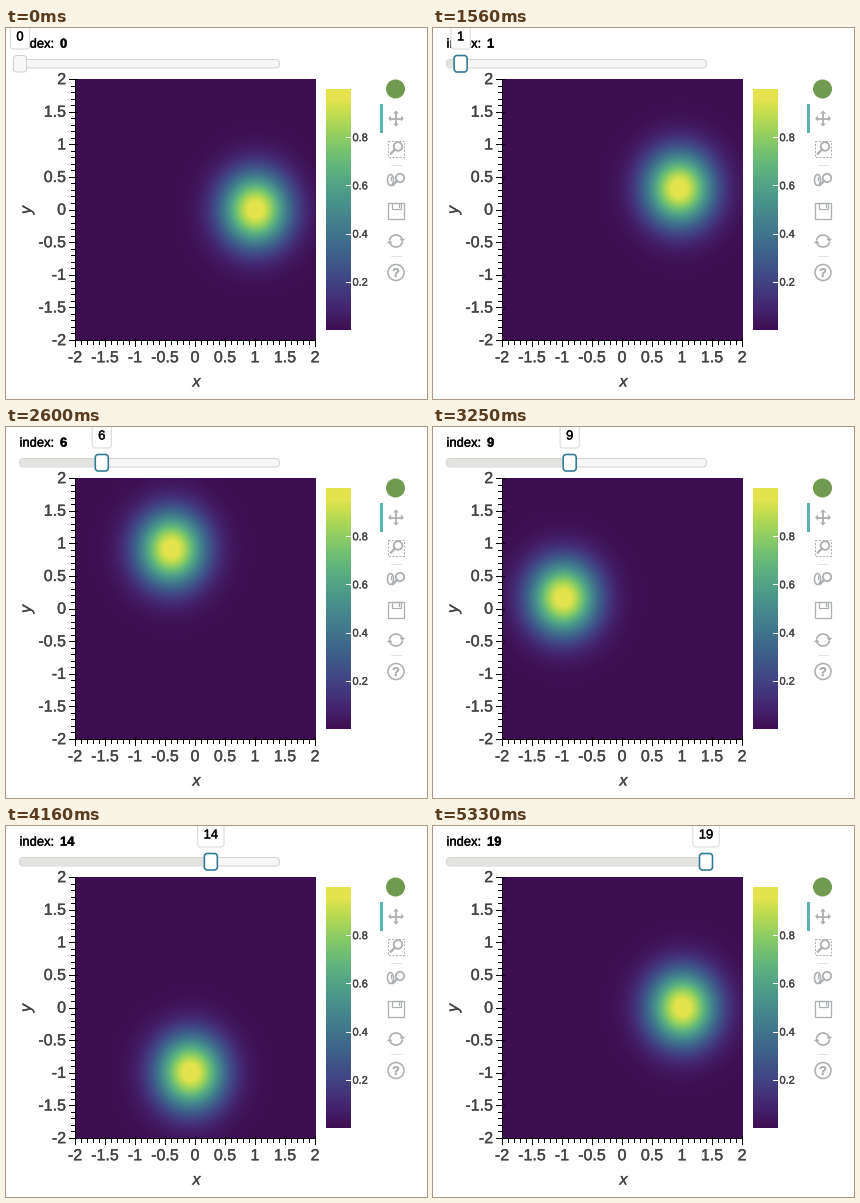
Write a matplotlib script that moves like this. It is 421x371 px and loops after 5980 ms.

```python
import numpy as np
import matplotlib.pyplot as plt
from matplotlib.animation import FuncAnimation
from matplotlib.colors import ListedColormap
from matplotlib.patches import (Circle, Ellipse, FancyBboxPatch, Polygon,
                                Rectangle)
from matplotlib.patheffects import withStroke

W, H, DPI = 421, 371, 100
FRAMES, INTERVAL = 46, 130
LEFT, RIGHT, TOP, BOTTOM = 69, 309, 51, 312
TRACK_X, TRACK_W, LAST = 14, 259, 19
SHARPNESS = 3.125
FOCUS_START = 6
# Frames on which the slider advances by one
STEPS = [12, 14, 15, 16, 18, 20, 22, 23, 25, 26,
         28, 29, 30, 32, 33, 35, 37, 39, 40]
INK, ICON = "#444444", "#adb0b2"

plt.rcParams["font.family"] = "Liberation Sans"
fig = plt.figure(figsize=(W / DPI, H / DPI), dpi=DPI, facecolor="white")
ax = fig.add_axes([0, 0, 1, 1])
ax.axis("off")


def soft_viridis():
    """Viridis as a wide-gamut screen shows it: muted, with a flat top."""
    rgb = plt.get_cmap("viridis")(np.linspace(0, 1, 256).clip(0, 0.96))[:, :3]
    linear = np.where(rgb <= 0.04045, rgb / 12.92,
                      ((rgb + 0.055) / 1.055) ** 2.4)
    mix = np.array([[0.8225, 0.1775, 0],
                    [0.07, 0.93, 0],
                    [0.0171, 0.0724, 0.9105]])
    linear = linear @ mix.T
    rgb = np.where(linear <= 0.0031308, linear * 12.92,
                   1.055 * linear ** (1 / 2.4) - 0.055)
    return ListedColormap(rgb.clip(0, 1))


CMAP = soft_viridis()


def pt(px):
    return px * 72 / DPI


def text(x, y, s, px, color=INK, ha="center", va="baseline", **kw):
    glow = [withStroke(linewidth=pt(0.35), foreground=color)]
    return ax.text(x, y, s, fontsize=pt(px), color=color, ha=ha, va=va,
                   path_effects=glow, **kw)


def label(x, cy, s, px, color=INK, **kw):
    """Text whose digits are vertically centred on cy."""
    return text(x, cy + 0.358 * px, s, px, color, **kw)


def line(xs, ys, color=ICON, lw=1.2, z=3):
    return ax.plot(xs, ys, color=color, lw=pt(lw), zorder=z)[0]


def rounded(x, y, w, h, r, face, edge, lw=1.0, z=4):
    box = FancyBboxPatch((x, y), w, h, fc=face, ec=edge, lw=pt(lw), zorder=z,
                         boxstyle=f"round,pad=0,rounding_size={r}")
    return ax.add_patch(box)


def outline(patch, lw=1.3):
    patch.set(fill=False, edgecolor=ICON, linewidth=pt(lw), zorder=3)
    return ax.add_patch(patch)


def arrowhead(x, y, dx, dy, size=3):
    """Filled triangle with its tip at (x, y), pointing along (dx, dy)."""
    bx, by = x - dx * size, y - dy * size
    ax.add_patch(Polygon([(x, y), (bx + dy * size, by + dx * size),
                          (bx - dy * size, by - dx * size)],
                         color=ICON, lw=0, zorder=3))


def px_x(v):
    return LEFT + (v + 2) / 4 * (RIGHT - LEFT)


def px_y(v):
    return BOTTOM - (v + 2) / 4 * (BOTTOM - TOP)


def draw_axes():
    line([LEFT, LEFT], [TOP, BOTTOM], "black", 1)
    line([LEFT, RIGHT], [BOTTOM, BOTTOM], "black", 1)
    for n in range(-20, 21):
        v = n / 10
        major = n % 5 == 0
        inner, outer = (2, 6) if major else (0, 4)
        line([px_x(v)] * 2, [BOTTOM - inner, BOTTOM + outer], "black", 1)
        line([LEFT + inner, LEFT - outer], [px_y(v)] * 2, "black", 1)
        if major:
            label(px_x(v), 328.5, f"{v:g}", 16)
            label(60, px_y(v) - 0.6, f"{v:g}", 16, ha="right")
    text(190.5, 358.5, "x", 16, style="italic")
    text(20.5, 182, "y", 16, style="italic", rotation=90, va="center")


def draw_colorbar():
    ramp = np.linspace(1, 0, 256)[:, None]
    ax.imshow(ramp, cmap=CMAP, extent=(320, 345, 302, 61),
              aspect="auto", zorder=2)
    for v in (0.2, 0.4, 0.6, 0.8):
        y = 302 - 241 * v
        line([340, 345], [y, y], "white", 1)
        label(346.5, y, f"{v:g}", 11, ha="left")


def magnifier(x, y, r):
    outline(Circle((x, y), r), 1.8)
    d = r * 0.72
    line([x - d, x - d - 4], [y + d, y + d + 4], lw=2.3)


def draw_toolbar():
    cx = 390
    ax.add_patch(Circle((389.5, 61), 9.5, color="#6f9a4f", lw=0))
    ax.add_patch(Rectangle((374, 76), 3, 29, color="#5ab4b4", lw=0))
    for y in (137, 228):
        line([385, 395], [y, y], "#e3e3e3", 1)

    # Pan
    line([cx - 6, cx + 6], [90.5, 90.5], lw=1.8)
    line([cx, cx], [84.5, 96.5], lw=1.8)
    for dx, dy in ((1, 0), (-1, 0), (0, 1), (0, -1)):
        arrowhead(cx + 8 * dx, 90.5 + 8 * dy, dx, dy)

    # Box zoom
    outline(Rectangle((382, 113), 16, 16), 1).set_linestyle((0, (2, 1.5)))
    magnifier(392, 118.5, 4.3)

    # Wheel zoom
    outline(Ellipse((384.5, 152), 6, 11), 1.6)
    line([384.5, 384.5], [148.5, 151.5], lw=1.2)
    magnifier(394, 150, 4.2)

    # Save
    outline(Rectangle((382, 175), 16, 16))
    outline(Rectangle((386, 175), 9, 6), 1.2)
    line([392.5, 392.5], [176, 179], lw=1.2)

    # Reset
    for start, side in ((195, 1), (15, -1)):
        t = np.radians(np.linspace(start, start + 140, 30))
        line(cx + 6.5 * np.cos(t), 213 + 6 * np.sin(t), lw=1.7)
        arrowhead(cx + 6.3 * side, 213 + 0.8 * side, 0, side, 3)

    # Help
    outline(Circle((cx, 244.5), 8), 1.6)
    label(cx, 244.5, "?", 12.5, ICON, weight="bold")


def handle_x(index):
    return TRACK_X + TRACK_W * index / LAST


draw_axes()
draw_colorbar()
draw_toolbar()

label(13.5, 15, "index:", 13, "black", ha="left")
value = label(54, 15, "0", 13, "black", ha="left", weight="bold")
rounded(13.5, 31.5, 260, 8.5, 4, "#f6f6f6", "#d2d2d2")
filled = rounded(14, 32, 1, 7.5, 3, "#e3e4e0", "none", 0, 5)
handle = rounded(0, 27.5, 13, 16.5, 3, "white", "#d9d9d9", 1, 7)
tip = rounded(0, -6, 19, 27, 3, "white", "#d9d9d9", 1, 7)
tip_text = label(0, 7.8, "0", 13, "black", zorder=8)

# The image reaches one pixel past the last tick
cols, rows = RIGHT - LEFT + 1, BOTTOM - TOP
grid_x = np.linspace(-2, 2, cols)[None, :]
grid_y = np.linspace(2, -2, rows)[:, None]
heat = ax.imshow(np.zeros((rows, cols)), cmap=CMAP, vmin=0, vmax=1,
                 extent=(LEFT, RIGHT + 1, BOTTOM, TOP), aspect="auto",
                 interpolation="nearest", zorder=1)
ax.set(xlim=(0, W), ylim=(H, 0))


def update(k):
    index = sum(k >= s for s in STEPS)
    angle = 2 * np.pi * index / LAST
    r2 = (grid_x - np.cos(angle)) ** 2 + (grid_y - np.sin(angle)) ** 2
    heat.set_data(np.exp(-SHARPNESS * r2))

    x = handle_x(index)
    focused = k >= FOCUS_START
    handle.set_x(x - 6.5)
    handle.set_edgecolor("#2f7896" if focused else "#d0d0d0")
    handle.set_facecolor("white" if focused else "#f8f8f8")
    handle.set_linewidth(pt(1.6 if focused else 1))
    filled.set_width(max(x - TRACK_X, 6))
    filled.set_visible(index > 0)

    digits = str(index)
    width = 12 + 7.2 * len(digits)
    tip.set_x(x - width / 2)
    tip.set_width(width)
    tip_text.set_x(x)
    tip_text.set_text(digits)
    value.set_text(digits)
    return heat, handle, filled, tip, tip_text, value


anim = FuncAnimation(fig, update, frames=FRAMES, interval=INTERVAL,
                     repeat=True, repeat_delay=0, blit=False)
plt.show()
```
